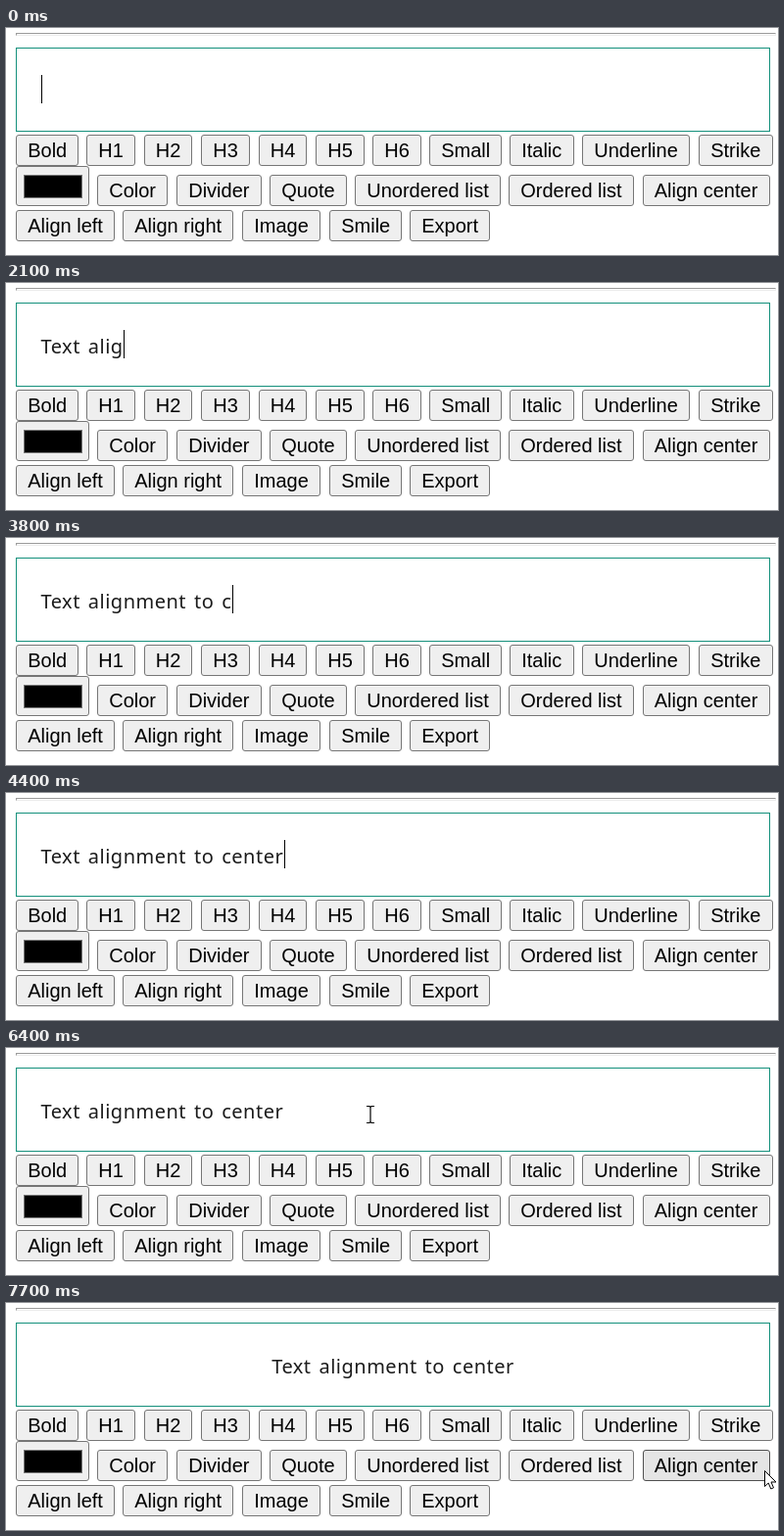
An HTML page that plays this animation: 788 by 232 pixels, repeating every 8000 ms.

```html
<!DOCTYPE html>
<html lang="en">
<head>
<meta charset="utf-8">
<title>Text alignment</title>
<style>
html, body { margin: 0; width: 100%; height: 100%; overflow: hidden; background: #fff; }
body { position: relative; cursor: default; }
body * { position: absolute; box-sizing: border-box; white-space: pre; }
#rule { left: 10px; top: 5px; width: 776px; height: 3px; border: 1px solid; border-color: #9a9a9a #eee #eee #9a9a9a; }
#editor { left: 10px; top: 20px; width: 770px; height: 86px; border: 1px solid #14907c; }
#text { left: 35.5px; top: 51px; font: 20px/27px "Noto Sans", sans-serif; letter-spacing: .5px; word-spacing: 2.2px; color: #1c1c1c; }
#caret { top: 48px; width: 1px; height: 29px; background: #000; }
.button { height: 32px; padding: 0 11.2px; border: 1px solid #767676; border-radius: 3px; background: #efefef; color: #000; font: 20px/30px "Liberation Sans", Arial, sans-serif; }
.hover { background: #e5e5e5; border-color: #4f4f4f; }
#swatch { left: 10px; top: 141px; width: 75px; height: 41px; }
#swatch i { left: 7px; top: 8px; width: 60px; height: 24px; background: #000; border: 1px solid #777; }
svg { left: 0; top: 0; overflow: visible; }
</style>
</head>
<body>
<div id="rule"></div>
<div id="editor"></div>
<span id="text"></span>
<div id="caret"></div>
<div id="swatch" class="button"><i></i></div>
<svg id="pointer" width="1" height="1">
  <path id="beam" d="M-4 -8.5h3l1 1l1 -1h3M0 -7.5v15M-4 8.5h3l1 -1l1 1h3" fill="none" stroke="#000" stroke-width="1.2"/>
  <path id="arrow" d="M.5 .5V16.5L4.2 13L6.8 19L9.5 17.8L7 12H12Z" fill="#fff" stroke="#000"/>
</svg>
<script>
const $ = id => document.getElementById(id);
const text = $('text'), caret = $('caret'), pointer = $('pointer');
const LOOP = 8000, MESSAGE = 'Text alignment to center';

// Each row: top edge, then label and left edge pairs
const rows = [
  [109, 'Bold', 10, 'H1', 82, 'H2', 140.5, 'H3', 199, 'H4', 257.5, 'H5', 316, 'H6', 374,
    'Small', 432, 'Italic', 514, 'Underline', 588, 'Strike', 707],
  [150, 'Color', 93, 'Divider', 174, 'Quote', 269, 'Unordered list', 356, 'Ordered list', 513, 'Align center', 649.5],
  [186, 'Align left', 10, 'Align right', 119, 'Image', 241, 'Smile', 330, 'Export', 412]
];
const buttons = [];
for (const [top, ...items] of rows) {
  for (let i = 0; i < items.length; i += 2) {
    const button = document.createElement('div');
    button.className = 'button';
    button.textContent = items[i];
    button.style.cssText = `left:${items[i + 1]}px;top:${top}px`;
    document.body.insertBefore(button, pointer);
    buttons.push(button);
  }
}

// Time at which each character of the message appears
const keys = [500, 800, 1000, 1200, 1400, 1500, 1700, 1800, 2000, 2200, 2500, 2700, 2900, 3100,
  3300, 3500, 3600, 3700, 3800, 4000, 4200, 4300, 4350, 4400];
const blinks = [4900, 5400, 5900, 6450, 6950];

// Pointer stops: time, x, y
const stops = [[6400, 372, 68], [7200, 761, 160], [7700, 774, 171]];

function pointerAt(t) {
  if (t >= 7700) return stops[2].slice(1);
  const i = t < 7200 ? 0 : 1;
  const [t0, x0, y0] = stops[i], [t1, x1, y1] = stops[i + 1];
  const p = Math.max(0, (t - t0) / (t1 - t0)), e = p * p * (3 - 2 * p);
  return [x0 + (x1 - x0) * e, y0 + (y1 - y0) * e];
}

function draw(t) {
  const passed = list => list.filter(time => time <= t).length;
  text.textContent = MESSAGE.slice(0, passed(keys));
  const width = text.getBoundingClientRect().width;
  text.style.left = (t < 7500 ? 35.5 : 395 - width / 2) + 'px';
  caret.style.left = Math.round(36 + width) + 'px';
  caret.style.visibility = passed(blinks) % 2 ? 'hidden' : 'visible';

  const shown = t >= 6400, [x, y] = pointerAt(t), inEditor = y < 106;
  pointer.style.display = shown ? 'block' : 'none';
  pointer.style.transform = `translate(${Math.round(x)}px,${Math.round(y)}px)`;
  $('beam').style.display = inEditor ? 'inline' : 'none';
  $('arrow').style.display = inEditor ? 'none' : 'inline';
  for (const button of buttons) {
    const box = button.getBoundingClientRect();
    const over = x >= box.left && x < box.right && y >= box.top && y < box.bottom;
    button.classList.toggle('hover', shown && over);
  }
}

const start = performance.now();
function frame() {
  draw((performance.now() - start) % LOOP);
  requestAnimationFrame(frame);
}
frame();
</script>
</body>
</html>
```
